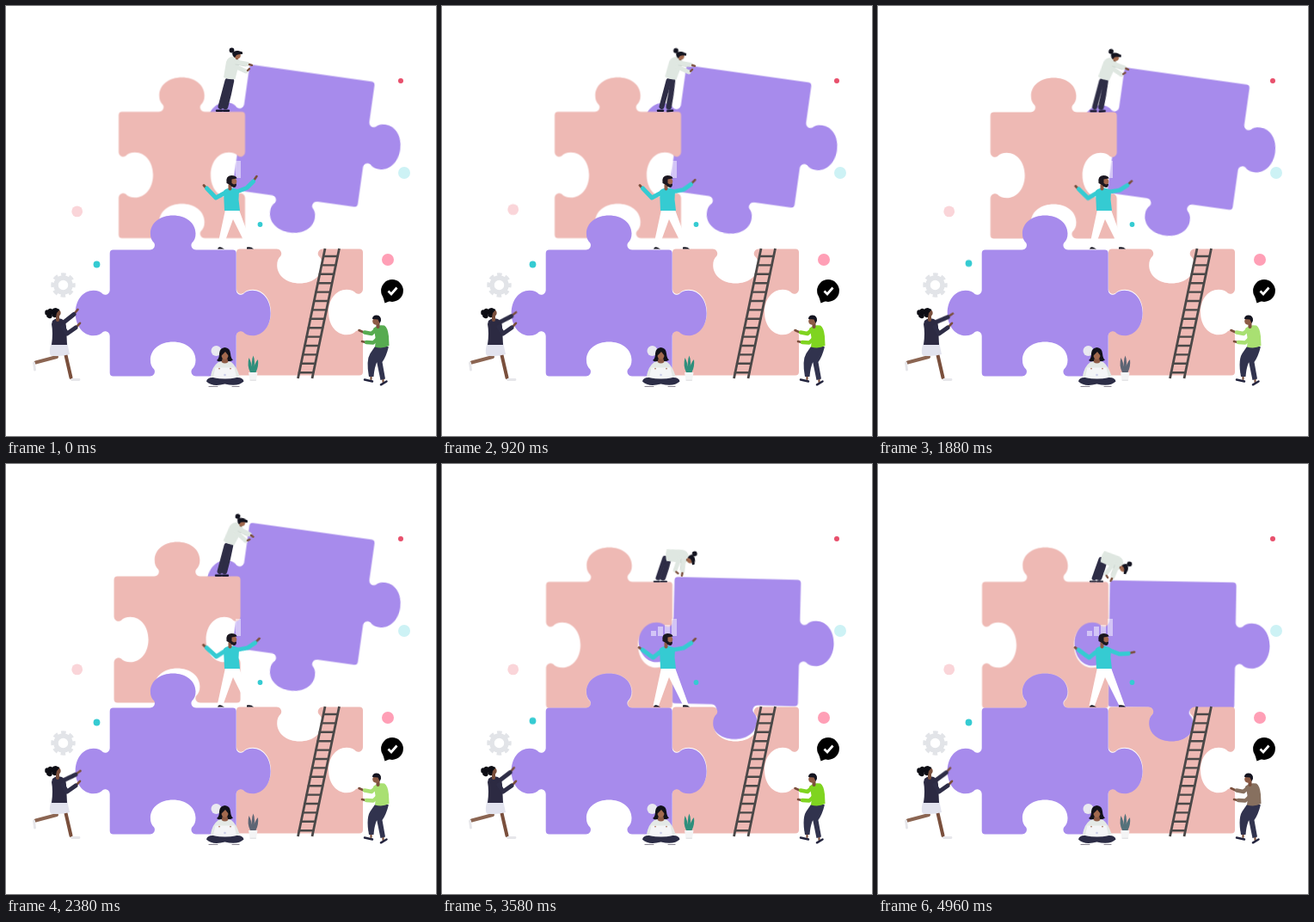
These frames come from a looping animation (500 by 500 pixels, 4980 ms). An HTML page:

```html
<!DOCTYPE html>
<html lang="en">
<head>
<meta charset="utf-8">
<title>Puzzle team</title>
<style>
html, body { margin: 0; width: 100%; height: 100%; overflow: hidden; background: #fff; }
svg { display: block; width: 100vw; height: 100vh; }
.line { fill: none; stroke-linecap: round; stroke-linejoin: round; }
.purple { fill: #a78bec; }
.pink { fill: #eeb9b4; }
.teal { fill: #35cbd2; }
.skin { stroke: #7a4f3c; }
.navy { stroke: #2e2d46; }

.slide, .drop, .settle, .step, .stance, .squat, .bend, .reach,
.wave, .lift, .shove, .shirt, .leaf, .bob, .hop {
  animation: 4980ms cubic-bezier(.37, 0, .63, 1) infinite;
}
.slide { animation-name: slide; }
.drop { animation-name: drop; }
.settle { animation-name: settle; }
.step { animation-name: step; }
.stance { animation-name: stance; transform-origin: 259px 86px; }
.squat { animation-name: squat; transform-origin: 253px 123px; }
.bend { animation-name: bend; transform-origin: 260px 85px; }
.reach { animation-name: reach; transform-origin: 267px 65px; }
.wave { animation-name: wave; transform-origin: 268px 217px; }
.lift { animation-name: lift; transform-origin: 257px 216px; }
.shove { animation-name: shove; transform-origin: 68px 368px; }
.shirt { animation-name: shirt; animation-timing-function: step-end; }
.leaf { animation-name: leaf; animation-timing-function: step-end; }
.bob { animation-name: bob; animation-duration: 2490ms; }
.hop { animation-name: hop; animation-duration: 2490ms; }

@keyframes slide {
  0%, 35.14% { transform: translate(204.5px, 196.5px); }
  59.24%, 100% { transform: translate(194.5px, 210.5px); }
}
@keyframes drop {
  0%, 16.06%, 32.13%, 48.19% { transform: translate(346px, 151px) rotate(8deg); }
  8.03%, 24.1%, 40.16% { transform: translate(350.3px, 155.3px) rotate(8deg); }
  57.23% {
    transform: translate(344.4px, 150px) rotate(8deg);
    animation-timing-function: cubic-bezier(.65, 0, .35, 1);
  }
  76.31%, 100% { transform: translate(342px, 210px) rotate(1deg); }
}
@keyframes settle {
  0%, 35.14% { transform: translateY(0); }
  59.24%, 100% { transform: translateY(14.5px); }
}
@keyframes step {
  0% { transform: translateX(0); }
  9.24%, 27.71% { transform: translateX(6px); }
  47.79% { transform: translateX(-1px); }
  62.65% { transform: translateX(1px); }
  76.31%, 100% { transform: translateX(2px); }
}
@keyframes stance {
  0%, 47.79%, 100% { transform: rotate(0); }
  9.24% { transform: rotate(-3deg); }
  27.71% { transform: rotate(-7deg); }
}
@keyframes squat {
  0%, 47.79% { transform: scaleY(1); }
  62.65% { transform: scaleY(.92); }
  76.31%, 100% { transform: scaleY(.75); }
}
@keyframes bend {
  0% { transform: rotate(0); }
  9.24% { transform: rotate(5deg); }
  27.71% { transform: rotate(7deg); }
  47.79% { transform: rotate(14deg); }
  62.65% { transform: translateY(3px) rotate(21deg); }
  76.31%, 100% { transform: translate(-2px, 8px) rotate(101deg); }
}
@keyframes reach {
  0% { transform: rotate(0); }
  9.24%, 27.71% { transform: rotate(-6deg); }
  47.79% { transform: rotate(4deg); }
  62.65% { transform: rotate(7deg); }
  76.31%, 100% { transform: rotate(1deg); }
}
@keyframes wave {
  0% { transform: rotate(0); }
  9.24% { transform: rotate(5deg); }
  27.71% { transform: rotate(14deg); }
  47.79% { transform: rotate(11deg); }
  62.65% { transform: rotate(1deg); }
  81.12% { transform: rotate(22deg); }
  99.6%, 100% { transform: rotate(42deg); }
}
@keyframes lift {
  0%, 27.71% { transform: rotate(0); }
  47.79% { transform: rotate(-4deg); }
  62.65%, 100% { transform: rotate(-10deg); }
}
@keyframes shove {
  0%, 62.65% { transform: rotate(0); }
  9.24% { transform: rotate(4deg); }
  27.71% { transform: rotate(18deg); }
  47.79% { transform: rotate(13deg); }
  81.12%, 100% { transform: rotate(2deg); }
}
@keyframes shirt {
  0% { color: #57ab50; }
  4.62%, 55.22%, 90.36% { color: #87705f; }
  18.47%, 71.89% { color: #7fd420; }
  37.75% { color: #a9e072; }
  100% { color: #87705f; }
}
@keyframes leaf {
  0%, 55.22% { fill: #2f8f7c; }
  37.75% { fill: #5d6574; }
  90.36%, 100% { fill: #54717a; }
}
@keyframes bob {
  0%, 44%, 100% { transform: translateY(0); }
  22% { transform: translateY(-10px); }
}
@keyframes hop {
  0%, 36%, 82%, 100% { transform: translateY(0); }
  59% { transform: translateY(-7px); }
}
</style>
</head>
<body>
<svg viewBox="0 0 500 500">
  <!-- Loose dots and badges -->
  <circle cx="459" cy="87" r="3" fill="#e8506c"/>
  <circle cx="463" cy="194" r="7" fill="#cdf2f5"/>
  <circle cx="444" cy="295" r="7" fill="#ff9fb6"/>
  <circle class="bob" cx="82.7" cy="238.9" r="6.4" fill="#fad5d9"/>
  <circle class="hop teal" cx="105.5" cy="300.5" r="3.9"/>
  <g transform="translate(66.5 324.5)" fill="none" stroke="#e2e4e8">
    <circle r="8.5" stroke-width="5.5"/>
    <circle r="12" stroke-width="4.4" stroke-dasharray="5.4 4.025" stroke-dashoffset="2.7"/>
  </g>
  <circle cx="449" cy="331" r="12.9"/>
  <path d="M438 337L440.5 345.500L449 342Z"/>
  <path class="line" d="M444.5 331.5L448 335L454.5 327.5" stroke="#fff" stroke-width="2.7" style="stroke-linecap:butt;stroke-linejoin:miter"/>

  <!-- Puzzle: sides are top, right, bottom, left -->
  <g class="drop"><path class="purple" data-sides="0 1 1 1"/></g>
  <g class="slide"><path class="pink" data-sides="1 -1 -1 -1"/></g>
  <path class="pink" data-sides="-1 -1 0 -1" transform="translate(341.5 356)"/>
  <path class="purple" data-sides="1 1 -1 1" transform="translate(194.2 357)"/>
  <path d="M243 194h6v6h-6zM251 189h6v11h-6zM259 187h6v13h-6zM267 180h6v20h-6z" fill="#fff" fill-opacity=".5"/>
  <circle cx="295.5" cy="254" r="2.9" class="teal"/>

  <g id="ladder" class="line" stroke="#4b4848">
    <path d="M371 282L339.500 433M387.500 282L356 433" stroke-width="2.800" style="stroke-linecap:butt"/>
  </g>

  <!-- Woman on top -->
  <g class="settle"><g class="step">
    <g class="squat">
      <g class="line navy" stroke-width="6">
        <path d="M257.500 87L249.500 117"/>
        <path d="M245 121.800h6" stroke="#16162a" stroke-width="2.400"/>
      </g>
      <g class="stance line navy" stroke-width="6.500">
        <path d="M262 87Q259 103 255 117"/>
        <path d="M253 121.800h6" stroke="#16162a" stroke-width="2.400"/>
      </g>
    </g>
    <g class="bend">
      <path d="M253 83L256 65Q258 58.500 265 58.500L270 60Q273 64 270 71L266.500 85Q259 86 253 83Z" fill="#dfe7e1"/>
      <path class="line skin" d="M268.500 57v4" stroke-width="3"/>
      <circle cx="269" cy="57.500" r="3.800" fill="#a2694e"/>
      <path d="M263 55Q265 51.500 270 52L275 53.500V56Q270 56 268 57L266 60Q263 58 263 55Z" fill="#141420"/>
      <circle cx="262.500" cy="51.500" r="2.900" fill="#141420"/>
      <g class="reach line">
        <path d="M267 65L281 67.500M266 70L279 76" stroke="#dfe7e1" stroke-width="5"/>
        <path d="M267 68L279 70" stroke="#cbd5cf" stroke-width=".8"/>
        <path d="M283 68L286 68.800M281 75L283 73" class="skin" stroke-width="2.400"/>
      </g>
    </g>
  </g></g>

  <!-- Man in the middle -->
  <path d="M255 237H271L287 281H280.500L264 248L252 281H245.500Z" fill="#fff"/>
  <path d="M246 282.500Q247 279.500 250 280.500L254 282.500ZM280 282.500V280.500Q285 279.500 288 282.500Z" fill="#141420"/>
  <g class="lift line">
    <path d="M233 212L230 208.500" class="skin" stroke-width="2.800"/>
    <path d="M257 216L244 223L233.500 212" stroke="#35cbd2" stroke-width="5"/>
  </g>
  <g class="wave line">
    <path d="M288 203L291.500 198" class="skin" stroke-width="2.600"/>
    <path d="M267 216.500L280 211.500L287.500 204" stroke="#35cbd2" stroke-width="5"/>
  </g>
  <path class="teal" d="M253 215Q256 211.500 262 211.500Q269 212 271 215L270.500 225L272 238H254Z"/>
  <path class="line" d="M260.500 208v4.500" stroke="#8d5b45" stroke-width="4"/>
  <circle cx="264" cy="204" r="4.300" fill="#a2694e"/>
  <path d="M256.500 206Q255 197.500 262 197Q268 197 268.500 200.500L262.500 201.500V206L265 207.500L268 206.500Q268 211 265 211Q262 210.500 260.500 208Z" fill="#1b1720"/>

  <!-- Runner -->
  <g class="line" stroke="#8b6552">
    <path d="M59 408L34.500 414.500" stroke-width="4"/>
    <path d="M69.500 406L75.500 432" stroke="#7a4f3c" stroke-width="4"/>
    <path d="M32.500 415L33.500 423M76.500 434.500H85" stroke="#e6e6ea" stroke-width="2.800"/>
  </g>
  <path d="M53 391H71L74 405Q64 408 52 406.500Q49 402 53 391Z" fill="#e2e3ee"/>
  <g class="shove line">
    <path d="M80 357L83.500 353" class="skin" stroke-width="2.600"/>
    <path d="M67 368L79 358.500" class="navy" stroke-width="5"/>
  </g>
  <path d="M54 366Q58 362 65 364Q70 367 70 373L71 394H53Q55 380 53 370Z" fill="#2c2a42"/>
  <g class="line">
    <path d="M83 372L86 368.800" class="skin" stroke-width="2.600"/>
    <path d="M66 373L71 381L81 374" class="navy" stroke-width="5"/>
    <path d="M60 361v4" class="skin" stroke-width="4"/>
  </g>
  <circle cx="59.500" cy="357" r="4.200" fill="#7a4f3c"/>
  <path d="M53 358Q52 351 58 351L62.500 353L59 357L58 362Q54 363 53 358Z" fill="#0d0d14"/>
  <path class="line" d="M48 356v1M50 360l1 .5M51.500 354.500v2" stroke="#0d0d14" stroke-width="5.500"/>

  <!-- Seated woman -->
  <circle cx="244.500" cy="401" r="6" fill="#e9e9f0"/>
  <path d="M245 412Q248 410 248 404Q248.500 397.500 254.500 397Q260.500 397.500 261 404Q261.500 410 264 411.500Q261 414 258 413H251Q248 414.500 245 412Z" fill="#12121a"/>
  <path d="M247 414Q255 411.500 262 414Q268 419 271.500 430L267 433H242L238 430Q240 419 247 414Z" fill="#e4e9e6"/>
  <path d="M252 409h5l1.500 5q-4 3-8 0z" fill="#8d5b45"/>
  <ellipse cx="254.500" cy="406" rx="4" ry="5" fill="#a2694e"/>
  <path d="M250 407Q249.500 399.500 254 399.500Q259.500 399.500 259 407L255 402Z" fill="#12121a"/>
  <path d="M233 436.500Q234 431.500 241 432Q255 434 268 432Q275.500 431.500 276.500 436.500Q270 443 254.500 439.500Q240 443.500 233 436.500Z" fill="#2c2d46"/>
  <path d="M243.500 420.500H265.500L268 432Q255 435 241 432Z" fill="#f4f5f7"/>
  <circle cx="254.500" cy="429" r="1.300" fill="#c9cbe8"/>
  <path class="line" d="M248 421.500v.2M261 421.500v.2" stroke="#a2694e" stroke-width="1.500"/>
  <path class="line" d="M236 442.500H246M263 442.500H271" stroke="#8a8592" stroke-width="1.200"/>

  <!-- Plant -->
  <path class="leaf" d="M284 426Q280 418 282.500 409Q286 415 287 426Q284.500 413 287.500 406.500Q290.500 413 287.500 426Q288.500 415 293 411Q294 419 290.500 426Z"/>
  <path d="M282 426H292.500L291 435H283.500Z" fill="#f4f4f5"/>
  <path class="line" d="M284 435.200h6.500" stroke="#d9d9dd" stroke-width="1"/>

  <!-- Man at the right -->
  <g class="line">
    <path d="M424.500 430v4M438.500 433v4" class="skin" stroke-width="2.200"/>
    <path d="M417 434.500L426 436.500M436 440.300L442.500 436.500" stroke="#23243e" stroke-width="2.500"/>
  </g>
  <path d="M429 396H444L440 404Q429 410 427.500 431H422Q418.500 412 423.500 404ZM434 401L445 396Q442 408 437.500 414L441 433.500L435.500 435L431 413Z" fill="#31334e"/>
  <g class="shirt">
    <g class="line">
      <path d="M416 379.500L410.500 377M418 391L414 390" class="skin" stroke-width="2.600"/>
      <path d="M430 376.500L425 381L417 379.500M434 385L427 391.500L419 391" stroke="currentColor" stroke-width="4.400"/>
    </g>
    <path d="M427 375Q432 370 440 371.500Q444 374 445 384L445.500 395Q438 399 429 396.500Q431 385 427 375Z" fill="currentColor"/>
  </g>
  <path class="line skin" d="M432.500 369v4" stroke-width="4"/>
  <circle cx="430.500" cy="366.500" r="4.300" fill="#8d5b45"/>
  <path d="M426 364Q426 359.500 431 359.500Q436.500 360 436 366L434.500 369L432.500 364.500Z" fill="#141420"/>
</svg>
<script>
const half = 73.5, corner = 4;
// Left half of a tab: distance along the side, distance outwards
const tab = [[-27, 0], [-22, 0], [-20, 5], [-22, 8], [-25, 11], [-26.3, 14],
  [-26.3, 19], [-26.3, 31.5], [-14.5, 40], [0, 40]];
const outline = [...tab, ...tab.slice(0, -1).reverse().map(([u, v]) => [-u, v])];

function turn(x, y, quarters) {
  for (let i = 0; i < quarters; i++) [x, y] = [-y, x];
  return `${x} ${y}`;
}

function piecePath(sides) {
  let d = '';
  sides.forEach((sign, q) => {
    const at = (u, v = 0) => turn(u, -half - v, q);
    d += (q ? 'L' : 'M') + at(corner - half);
    if (sign) {
      const [first, ...rest] = outline.map(([u, v]) => at(u, v * sign));
      d += `L${first}C${rest.join(' ')}`;
    }
    d += `L${at(half - corner)}Q${at(half)} ${at(half, -corner)}`;
  });
  return d + 'Z';
}

for (const el of document.querySelectorAll('[data-sides]')) {
  el.setAttribute('d', piecePath(el.dataset.sides.split(' ').map(Number)));
}

let rungs = '';
for (let y = 291; y < 432; y += 10.4) {
  rungs += `M${371 - (y - 282) * .209} ${y}h16.3`;
}
const path = document.createElementNS('http://www.w3.org/2000/svg', 'path');
path.setAttribute('d', rungs);
path.setAttribute('stroke-width', 2.4);
document.getElementById('ladder').append(path);
</script>
</body>
</html>
```
